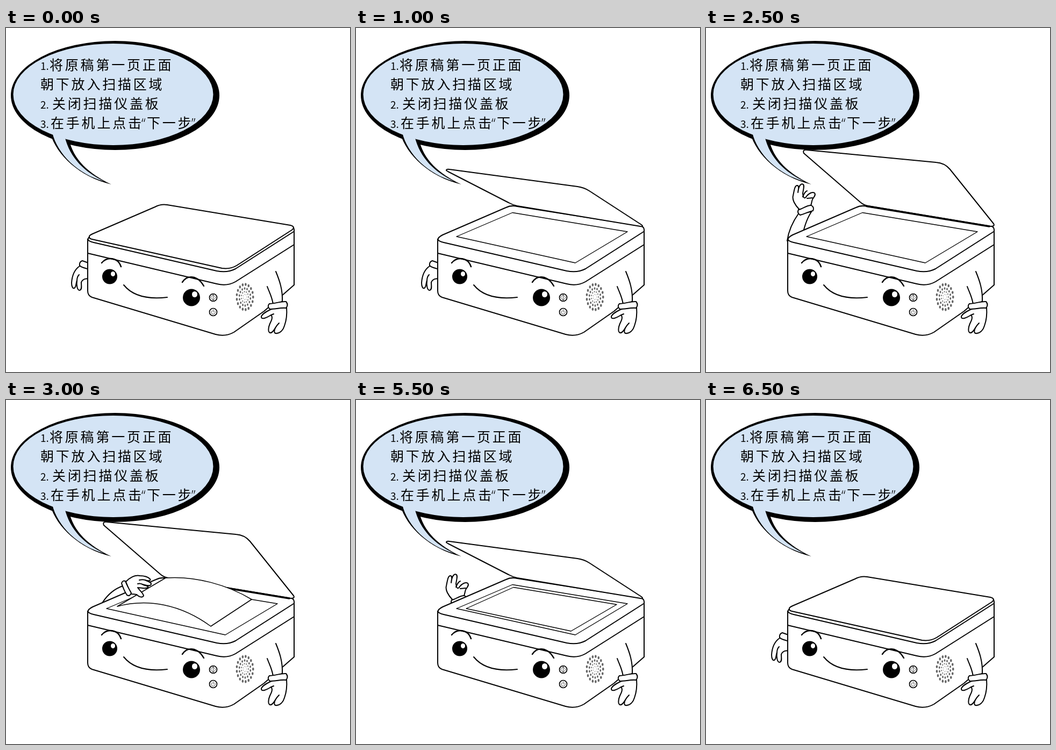
An HTML page without scripts for the animation above (6.7 s loop, 640 by 640 pixels).

```html
<!DOCTYPE html>
<html lang="zh">
<head>
<meta charset="utf-8">
<title>Scanner guide</title>
<style>
html, body { margin: 0; width: 100%; height: 100%; overflow: hidden; background: #fff; }
svg { display: block; width: 100%; height: 100%; }
.ink { fill: #fff; stroke: #000; stroke-width: 2; stroke-linecap: round; stroke-linejoin: round; }
.line { fill: none; }
.thin { stroke-width: 1.3; }
.solid { fill: #000; stroke: none; }
.dots { fill: none; stroke: #666; stroke-linecap: round; }
text { font: 300 25px "Noto Sans CJK SC", "Noto Sans CJK", "Noto Sans", sans-serif; letter-spacing: 3.8px; }
.num { font-size: 19px; letter-spacing: 0; }
.q { font-family: "Open Sans", "Noto Sans", sans-serif; letter-spacing: 0; }

/* hard pose changes on one 6.7 s clock */
.pose { animation: 6.7s step-end infinite; }
.shut { animation-name: shut; }
.low { animation-name: low; }
.mid { animation-name: mid; }
.open { animation-name: open; }
.rest { animation-name: rest; }
.out { animation-name: out; }
.up { animation-name: up; }
.hold { animation-name: hold; }
.press { animation-name: press; }
.wave { animation-name: wave; }
.flat { animation-name: flat; }
@keyframes shut { 0%, 97.014% { opacity: 1 } 7.462% { opacity: 0 } }
@keyframes low { 0%, 14.925%, 97.014% { opacity: 0 } 7.462%, 89.552% { opacity: 1 } }
@keyframes mid { 0%, 22.388%, 89.552% { opacity: 0 } 14.925%, 82.089% { opacity: 1 } }
@keyframes open { 0%, 82.089% { opacity: 0 } 22.388% { opacity: 1 } }
@keyframes rest { 0%, 97.014% { opacity: 1 } 29.85% { opacity: 0 } }
@keyframes out { 0%, 37.313% { opacity: 0 } 29.85% { opacity: 1 } }
@keyframes up { 0%, 44.776% { opacity: 0 } 37.313% { opacity: 1 } }
@keyframes hold { 0%, 52.238% { opacity: 0 } 44.776% { opacity: 1 } }
@keyframes press { 0%, 59.701% { opacity: 0 } 52.238% { opacity: 1 } }
@keyframes wave { 0%, 97.014% { opacity: 0 } 59.701% { opacity: 1 } }
@keyframes flat { 0%, 97.014% { opacity: 0 } 52.238% { opacity: 1 } }
</style>
</head>
<body>
<svg viewBox="0 0 640 640">
  <defs>
    <g id="palm">
      <path d="M180 372C171 363 166 353 168 346C170 337 171 326 176 327C180 328 178 334 177 340C178 331 181 323 186 324.500C190 326 187 334 186 342L187 348C189 351 191 351 193 347C197 342 204 338 208 341C211 345 206 349 204 353C202 358 203 361 200 366Z"/>
      <path class="line" d="M186 348C188 343 191 338 194 337M194 351L204 350"/>
      <path d="M178 372C185 371 194 363 202 364Q208 368 205 374C197 376 188 380 181 382Q175 378 178 372Z"/>
    </g>
    <g id="reach">
      <path class="line" d="M180 376C190 361 203 351 217 346"/>
      <path d="M223 338C230 331 239 325 249 327C257 327 264 329 268 333C270 337 264 337 259 335C265 338 271 339 270 343C268 348 260 344 254 343C260 346 266 346 264 349C258 352 250 349 245 349C249 355 255 359 256 364C254 369 247 366 243 362C239 361 236 361 232 361Z"/>
      <path class="line" d="M248 335C252 334 256 334 259 335M245 342C249 341 252 342 254 343"/>
      <path d="M215 341Q217 335 222 337C225 345 229 352 233 359Q231 366 225 363C221 357 218 350 215 341Z"/>
    </g>
  </defs>

  <!-- arms behind the body -->
  <g class="ink">
    <g class="pose rest">
      <path d="M137 443C128 449 123 460 122 474C122 481 124 485 127 484C131 482 130 474 132 470C131 477 132 488 137 488C142 487 140 479 140 473C142 468 146 466 156 466V436Z"/>
      <path class="line" d="M132 470C132 465 134 461 136 459"/>
      <path d="M137 442Q136 435 142 433L156 438V450C149 446 142 447 137 442Z"/>
    </g>
    <g class="pose out">
      <path d="M119 433C130 444 140 449 156 451V436C146 435 137 431 130 423Z"/>
      <use href="#palm" transform="translate(-66 60) rotate(-24 190 370)"/>
    </g>
    <g class="pose up">
      <path d="M173 344C163 358 154 374 151 396H178C181 374 187 356 196 342Z"/>
      <use href="#palm" transform="translate(-6 -34)"/>
    </g>
    <g class="pose wave"><use href="#palm"/></g>
  </g>

  <!-- body -->
  <g class="ink">
    <path d="M152 394Q153 389 161 385L279 334Q289 329 300 332L529 368Q536 370 536 375V478L480 527L424 566Q408 575 390 570L160 501Q152 498 152 489Z"/>
    <path class="line" d="M152 393Q154 397 163 399L392 452Q412 456 427 448L535 379M152 419L392 476Q411 481 427 472L536 403"/>
    <path class="thin" d="M187 388L291 343.500L505 379L408 437Z"/>
    <path class="thin pose flat" d="M205 388L293 348.500L485 380.500L400 430Z"/>
  </g>

  <!-- face -->
  <g class="ink">
    <path class="line" d="M178 437C188 425 208 426 214 444M328 473C337 459 356 459 368 480" stroke-width="2.4"/>
    <path class="line" d="M219 478C236 499 266 505 300 501"/>
    <circle class="solid" cx="193" cy="462.500" r="14"/>
    <circle class="solid" cx="345" cy="501.500" r="16"/>
    <ellipse cx="199" cy="457.500" rx="4" ry="4.500" stroke="none"/>
    <ellipse cx="351" cy="495.500" rx="5" ry="5.500" stroke="none"/>
  </g>

  <!-- buttons and speaker -->
  <g class="ink">
    <g stroke-width="1.700">
      <circle cx="385.500" cy="501.500" r="7"/>
      <circle cx="385.500" cy="528.500" r="7"/>
    </g>
    <path class="line" stroke-width=".7" d="M385.500 496L390 501.500L385.500 507L381 501.500ZM385.500 496V507M383 526A3.700 3.700 0 1 0 388 526M385.500 524V528.500"/>
  </g>
  <g class="dots" transform="translate(444.500 500.500) scale(.65 1)">
    <circle r="23.500" pathLength="17" stroke-width="5.600" stroke-dasharray="0 1"/>
    <circle r="16" pathLength="14" stroke-width="4.400" stroke-dasharray="0 1" transform="rotate(10)"/>
    <circle r="10" pathLength="11" stroke-width="2.800" stroke-dasharray="0 1"/>
    <circle r="5" pathLength="7" stroke-width="1.600" stroke-dasharray="0 1"/>
  </g>

  <!-- right arm -->
  <g class="ink">
    <path d="M486 481C490 492 495 500 497 514L514 509C515 487 509 470 502 453"/>
    <path d="M496 522C485 527 475 532 475 538C476 543 485 539 493 534C497 538 494 544 491 550C488 557 487 565 491 567C495 568 498 563 501 558C498 565 499 569 504 568C511 567 516 561 518 554C522 543 523 532 522 520Z"/>
    <path class="line" d="M493 534L498 532M501 558C503 554 506 551 508 549"/>
    <path d="M490 513C500 513 512 508 521 509Q526 515 521 521C511 520 501 523 491 523Q485 518 490 513Z"/>
  </g>

  <!-- lid -->
  <g class="ink">
    <path class="pose shut" d="M155 389Q154 386 161 383L277 333Q288 327 300 329L529 367Q538 369 533 375L429 442Q417 449 402 447L160 393Q155 392 155 389Z"/>
    <path class="pose low" d="M153 362Q150 359 158 357L278 331Q288 329 298 330L529 368Q535 370 530 373L428 407Q413 413 396 410L160 364Z"/>
    <path class="pose mid" d="M168 265Q168 262 174 263L412 295Q425 297 434 303L531 366Q536 370 529 369L300 331Q291 329 284 325L171 267Z"/>
    <g class="pose open">
      <path d="M182 233Q179 226 188 227L428 250Q444 251 454 263L535 364Q538 369 530 369L302 331Q294 330 287 324Z"/>
      <path class="line" d="M299 331.500L527 369" stroke-width="3.400"/>
    </g>
  </g>

  <!-- sheet and hand on top -->
  <g class="ink">
    <g class="pose hold">
      <path stroke-width="1.500" d="M207 384L297 331C353 327 412 344 457 371L381 421C325 380 264 369 207 384Z"/>
      <use href="#reach"/>
    </g>
    <g class="pose press"><use href="#reach" x="4" y="1"/></g>
  </g>

  <!-- speech bubble -->
  <path d="M83 198C94 235 136 277 196 291C154 271 125 245 117 206Z"/>
  <ellipse cx="203" cy="125.500" rx="194" ry="101.500"/>
  <ellipse cx="199.500" cy="123.500" rx="186" ry="94.500" fill="#d4e4f5"/>
  <path d="M86 194C95 235 136 273 182 285C147 268 119 243 109 201Z" fill="#d4e4f5"/>
  <text y="78"><tspan class="num" x="64">1.</tspan><tspan x="81">将原稿第一页正面</tspan></text>
  <text x="64" y="114">朝下放入扫描区域</text>
  <text y="150"><tspan class="num" x="64">2.</tspan><tspan x="86">关闭扫描仪盖板</tspan></text>
  <text y="186"><tspan class="num" x="64">3.</tspan><tspan x="83">在手机上点击</tspan><tspan class="q" x="252">“</tspan><tspan x="262">下一步</tspan><tspan class="q" x="345">”</tspan></text>
</svg>
</body>
</html>
```
